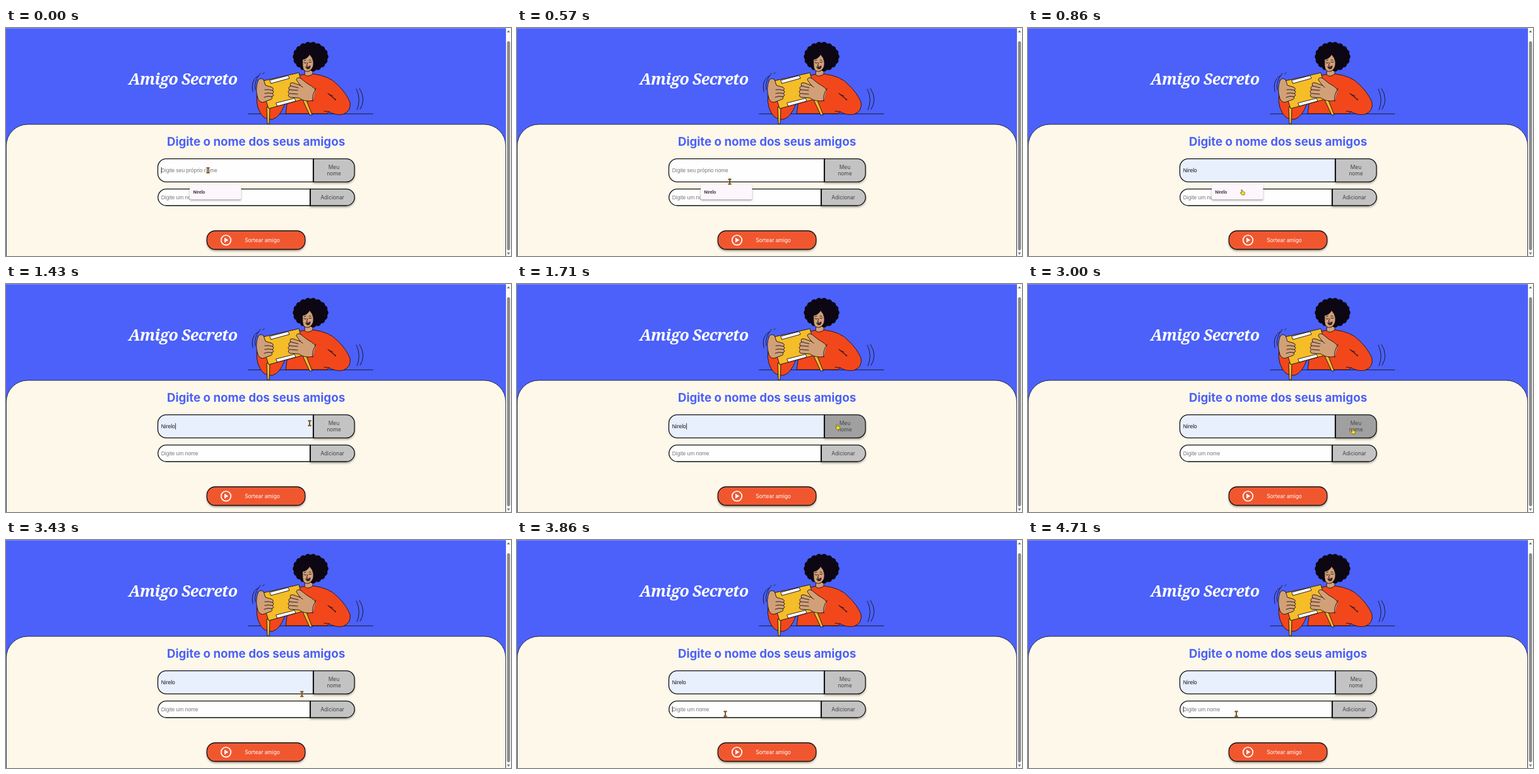
An HTML page for the animation above (5000 ms loop, 800 px wide and 362 px high).

```html
<!DOCTYPE html>
<html lang="pt-BR">
<head>
<meta charset="utf-8">
<title>Amigo Secreto</title>
<style>
  html, body { margin: 0; height: 100%; overflow: hidden; background: #4b61f9; }
  svg { display: block; width: 100vw; height: 100vh; }
  text { font: 8.4px Inter, sans-serif; }
  .title { font: italic 700 25px "Noto Serif", serif; letter-spacing: -.75px; fill: #fff; }
  .heading { font: 700 18.7px Inter, sans-serif; fill: #4b61f9; }
  .field { font: 8.4px "Liberation Sans", Arial, sans-serif; fill: #111; }
  .hint { fill: #777; }
  .option { font: 500 7px Roboto, sans-serif; fill: #222; }
  .mid { text-anchor: middle; }
  .box { stroke: #111; stroke-width: 1.3; }
  .shadow { filter: drop-shadow(0 2px 1.5px #0005); }
  .art { stroke: #17101c; stroke-width: .9; stroke-linejoin: round; stroke-linecap: round; }
  .line { fill: none; }
  .skin { fill: #d2a077; }
  .shirt { fill: #f2471b; }
  .gold { fill: #f5bd27; }
</style>
</head>
<body>
<svg viewBox="0 0 800 362" preserveAspectRatio="none">
  <rect width="800" height="362" fill="#4b61f9"/>
  <path d="M0 .3H792" stroke="#a9b3fa" stroke-width=".7"/>
  <path d="M.4 364V187A34 34 0 0 1 34 153H758A34 34 0 0 1 791.6 187V364Z" fill="#fdf8ea" stroke="#1c1c2c" stroke-width=".9"/>

  <text class="title" x="194" y="90">Amigo Secreto</text>

  <g class="art">
    <path class="line" d="M384 136.3H581M391 101Q387 84 399 76M395 98Q392 85 403 72M407 73l2-2
      M555 97Q563 113 556 130M560 96Q571 113 561 129"/>
    <path class="shirt" d="M470 74Q457 76 450 86L443 136H508L512 133Q522 139 534 137Q547 132 545 118Q539 103 524 89Q512 76 487 73Z"/>
    <path class="shirt" d="M400 94Q393 118 403 135Q409 146 422 145Q434 142 442 120L416 116Z"/>
    <path class="line" d="M510 104L523 114Q512 113 487 108M511 105l7 3M504 132l8 1"/>
    <path class="skin" d="M474 62L473 74Q478 79 486 73V58Z"/>
    <g id="hair" fill="#0c0713" stroke="none"><ellipse cx="482.5" cy="45.5" rx="24" ry="19"/></g>
    <path class="skin" d="M470 50Q477 49 481 42Q486 47 487 54Q488 65 479 69Q471 70 470 61Z"/>
    <path class="line" d="M472 55q2 1.5 4 0M480 54q2 1.5 4 0M478 55l-2 5h2M472 52l3-1M480 51l3 0"/>
    <path d="M475 62q4 1 7-2q0 5-4 5q-2 0-3-3Z" fill="#5a1717"/>

    <path class="gold" d="M413 126L414 152H417L418 126ZM469 112L481 138L485 138L474 110Z"/>
    <path class="gold" d="M407 84L464 71Q469 91 475 112L416 128Q409 108 407 84Z"/>
    <path d="M418 83L447 75.5L449 80L420 88ZM428 119L457 111.5L459 116L430 124Z" fill="#fff"/>
    <path class="skin" d="M399 84Q402 78 408 82L411 91L421 94Q425 96 422 99Q426 101 422 104Q426 107 421 109Q423 113 418 114L407 118Q400 118 398 108Q395 96 399 84Z"/>
    <path class="line" d="M410 98Q416 97 422 99M410 104Q416 102 422 104M409 110Q415 107 421 109"/>
    <path class="skin" d="M460 82Q461 77 467 80L477 88Q488 94 491 99L487 115Q473 118 464 111L450 110Q445 108 449 104Q445 102 449 98Q446 94 451 92Q448 86 455 87L466 91Z"/>
    <path class="line" d="M450 104L462 105M449 98L462 99M451 92L463 95M466 91L470 94"/>
    <path class="shirt" d="M491 96Q498 104 510 105Q520 110 522 116Q512 116 486 117Q489 107 491 96Z" stroke="none"/>
    <path class="line" d="M491 96Q484 107 486 116M510 104L522 114"/>
  </g>

  <text class="heading mid" x="396" y="187">Digite o nome dos seus amigos</text>

  <path id="ownField" class="box" d="M487 207.6H254A13.5 13.5 0 0 0 240.5 221V231A13.5 13.5 0 0 0 254 244.4H487Z"/>
  <text id="ownText" class="field" x="245.8" y="229"></text>
  <g class="shadow">
    <path id="ownButton" class="box" d="M487 207.6H539A13 13 0 0 1 552 221V231A13 13 0 0 1 539 244.4H487Z"/>
  </g>
  <g class="mid" fill="#444">
    <text x="519.5" y="224">Meu</text>
    <text x="519.5" y="234">nome</text>
  </g>

  <path class="box" d="M482 255.6H254A13.2 13.2 0 0 0 254 282H482Z" fill="#fefefe"/>
  <text class="field hint" x="245.8" y="271.5">Digite um nome</text>
  <path class="box shadow" d="M482 255.6H539A13.2 13.2 0 0 1 539 282H482Z" fill="#c3c3c3"/>
  <text class="mid" x="517" y="272" fill="#444">Adicionar</text>
  <path d="M487 207V245M482 255V282.5" stroke="#111" stroke-width="1.8"/>

  <rect class="box shadow" x="318.3" y="322" width="155.5" height="29.5" rx="13" fill="#f1572f"/>
  <circle cx="348.5" cy="336.8" r="7.8" fill="none" stroke="#fff" stroke-width="1.7"/>
  <path d="M346 332.8V340.8L352.3 336.8Z" fill="#fff"/>
  <text class="mid" x="406" y="339.6" fill="#fff">Sortear amigo</text>

  <g id="menu">
    <rect class="shadow" x="291" y="249" width="81.5" height="23" rx="2" fill="#fdf6fd"/>
    <text class="option" x="296.5" y="263.3">Nirelo</text>
  </g>

  <path id="caret" stroke="#111" stroke-width=".8"/>

  <rect x="792" width="8" height="362" fill="#fafafa"/>
  <rect x="793.7" y="21" width="4.8" height="332" rx="2.4" fill="#8a8a8a"/>
  <path d="M793.5 7L796 3.5L798.5 7ZM793.5 356.5L796 360L798.5 356.5Z" fill="#777"/>

  <g id="beam" fill="none">
    <path d="M-2.5-3.8H2.5M0-3.8V3.8M-2.5 3.8H2.5" stroke="#4b300d" stroke-width="1.9"/>
    <path d="M-2.2-3.8H2.2M0-3.8V3.8M-2.2 3.8H2.2" stroke="#bd8b35" stroke-width=".7"/>
  </g>
  <path id="hand" d="M-2.2-4Q-1-5-.4-3.5L.2-1.2L2.6-.7Q4-.2 3.5 1.8L2.8 4H-1L-3.6 1Q-3.5-.5-1.6.4Z" fill="#f6e322" stroke="#5a4a10" stroke-width=".7"/>
</svg>
<script>
const $ = id => document.getElementById(id);
const show = (el, on) => el.setAttribute("visibility", on ? "visible" : "hidden");
const LOOP = 5000, STEP = 1000 / 7;

// curls around the hair
for (let i = 0; i < 18; i++) {
  const a = i * Math.PI / 9;
  const curl = document.createElementNS("http://www.w3.org/2000/svg", "circle");
  curl.setAttribute("cx", 482.5 + 23 * Math.cos(a));
  curl.setAttribute("cy", 45.5 + 18.5 * Math.sin(a));
  curl.setAttribute("r", 5.2);
  $("hair").append(curl);
}

// pointer stops: step, x, y
const stops = [
  [0, 320, 226], [1, 320, 226], [4, 337, 244], [6, 340, 261], [8, 341, 261],
  [10, 481, 221], [12, 508, 227], [14, 516, 233], [18, 516, 233],
  [19, 515, 234], [23, 515, 234], [27, 330, 276], [35, 330, 276]
];

function pointerAt(step) {
  const i = stops.findIndex(stop => stop[0] > step);
  const [s0, x0, y0] = stops[i - 1], [s1, x1, y1] = stops[i];
  const p = (step - s0) / (s1 - s0);
  return [x0 + (x1 - x0) * p, y0 + (y1 - y0) * p];
}

function caretPath(step) {
  if (step < 3) return "M246.2 221V231";
  if (step >= 9 && step < 13) return "M268.6 221V231";
  if (step >= 27 && step < 31 || step >= 33) return "M246.2 264V273.5";
  return "";
}

function draw(now) {
  const step = Math.floor((now % LOOP + 5) / STEP) % 35;
  const filled = step >= 6;
  const onButton = step >= 12 && step <= 23;
  const onMenu = step >= 5 && step <= 8;

  $("ownField").setAttribute("fill", filled ? "#e8f0fe" : "#fefefe");
  $("ownText").textContent = filled ? "Nirelo" : "Digite seu próprio nome";
  $("ownText").classList.toggle("hint", !filled);
  $("ownButton").setAttribute("fill", onButton ? "#a0a0a0" : "#c3c3c3");
  $("caret").setAttribute("d", caretPath(step));
  show($("menu"), step < 9);

  const [x, y] = pointerAt(step);
  for (const id of ["beam", "hand"]) $(id).setAttribute("transform", `translate(${x} ${y})`);
  show($("hand"), onButton || onMenu);
  show($("beam"), !onButton && !onMenu);
}

function tick() {
  draw(performance.now());
  requestAnimationFrame(tick);
}
tick();
</script>
</body>
</html>
```
